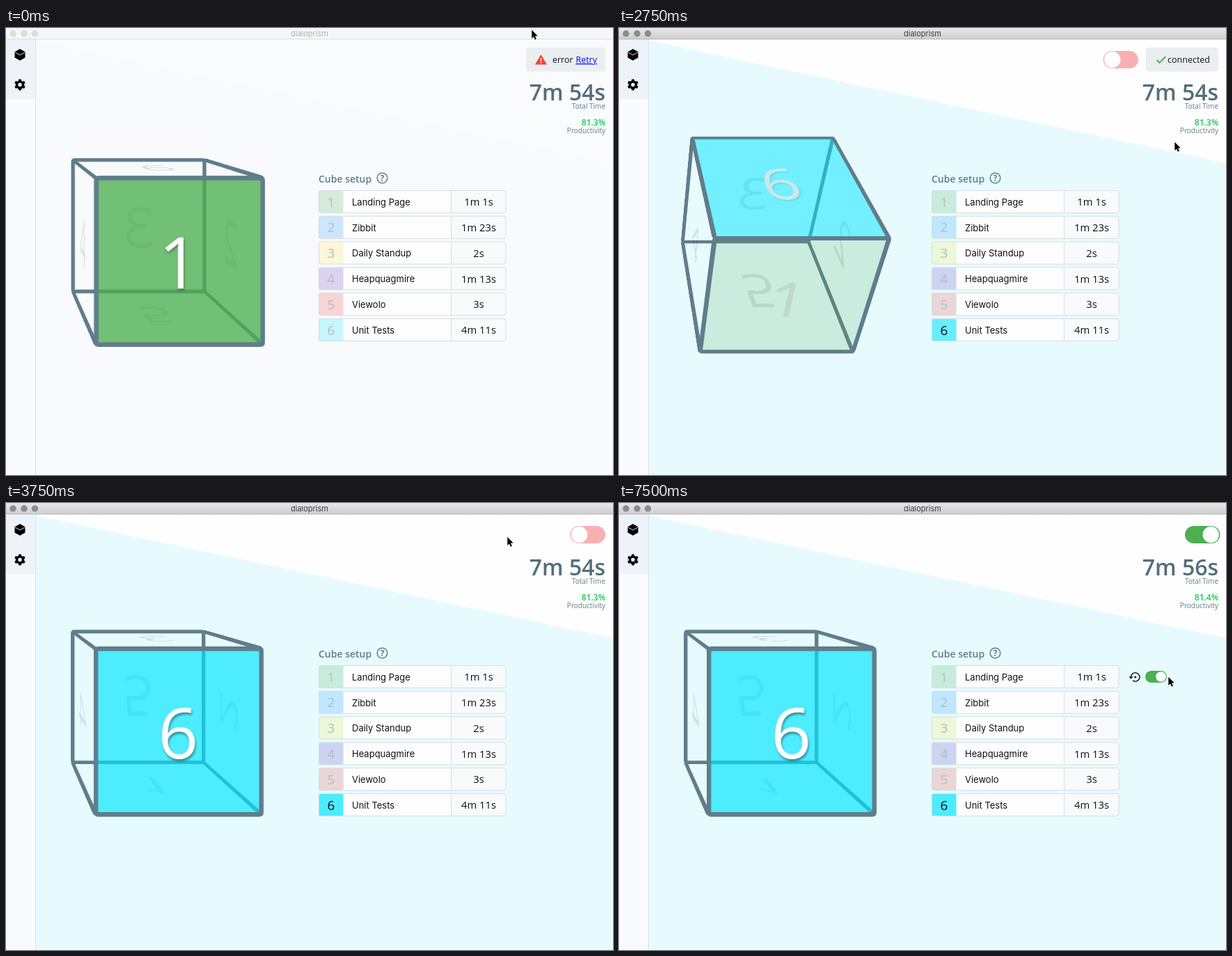
An HTML page that plays this animation: 872x642 px, repeating every 8 s.

```html
<!DOCTYPE html>
<html lang="en">
<head>
<meta charset="utf-8">
<title>Cube tracker</title>
<style>
html, body { margin: 0; width: 100%; height: 100%; overflow: hidden; background: #fff; }
#stage { position: absolute; left: 0; top: 0; width: 872px; height: 642px; overflow: hidden; }
svg { position: absolute; left: 0; top: 0; }
text { font-family: "Open Sans", "Noto Sans", sans-serif; fill: #111; }
.slate { fill: #607d8b; }
.ui { font-family: Inter, Roboto, sans-serif; }
.mid { text-anchor: middle; }
.end { text-anchor: end; }
#scene { position: absolute; inset: 0; perspective: 900px; perspective-origin: -29px 92px; }
#cube {
  position: absolute; left: 107.8px; top: 198px; width: 217px; height: 217px;
  transform-style: preserve-3d; transform-origin: 108.5px 104px .5px;
}
.face {
  position: absolute; inset: 0; box-sizing: border-box;
  border: 6px solid #607d8b; border-radius: 6px;
  font: 90px/205px "Open Sans", "Noto Sans", sans-serif; text-align: center;
  text-indent: -1px;
}
</style>
</head>
<body>
<div id="stage">
  <svg id="ui" width="872" height="642" viewBox="0 0 872 642">
    <defs>
      <linearGradient id="bar" x2="0" y2="1">
        <stop offset="0" stop-color="#e8e8e8"/><stop offset="1" stop-color="#cecece"/>
      </linearGradient>
    </defs>
    <rect id="back" width="872" height="642"/>
    <path id="wedge" d="M42 16H872V194L42 18z"/>
    <rect y="16" width="42" height="626" fill="#f8fafd"/>
    <rect y="16" width="42" height="86" fill="#eef2f9"/>
    <path d="M42.5 16V642" stroke="#dbe1e9"/>

    <path d="M20 30l7.5 4.2v8.4L20 46.800l-7.500-4.200v-8.400z"/>
    <path d="M13 35l7 3.800 7-3.800" fill="none" stroke="#eef2f9" stroke-width=".9"/>
    <g fill="none" stroke="#000">
      <circle cx="20" cy="81.500" r="4.500" stroke-width="3.600"/>
      <circle cx="20" cy="81.500" r="6.800" stroke-width="2.400" pathLength="12" stroke-dasharray="1 1" stroke-dashoffset="-.5"/>
    </g>

    <rect id="title" width="872" height="16"/>
    <path id="rule" d="M0 16H872"/>
    <g id="dots"><circle cx="10" cy="8" r="4.700"/><circle cx="26" cy="8" r="4.700"/><circle cx="41.500" cy="8" r="4.700"/></g>
    <text id="name" class="ui mid" x="436" y="12" font-size="11">dialoprism</text>

    <g id="error">
      <rect x="747" y="28" width="114" height="34.500" rx="4" fill="#ebeef1"/>
      <path d="M768.500 38l8.500 14.500h-17z" fill="#f44336"/>
      <path d="M768.500 43.500v4m0 1.300v1.700" stroke="#fff" stroke-width="1.500"/>
      <text x="785" y="50" font-size="12.500">error</text>
      <text x="849" y="50" font-size="12.500" class="end" style="fill:#0a0aee" text-decoration="underline">Retry</text>
    </g>
    <g id="connected">
      <rect x="757" y="28" width="104" height="34.500" rx="4" fill="#ebeef1"/>
      <path d="M772.500 46l4 4 8.800-9" fill="none" stroke="#4caf50" stroke-width="1.900"/>
      <text x="849" y="50" font-size="12.500" class="end">connected</text>
    </g>
    <g id="toggle">
      <rect y="33" width="50.500" height="25" rx="12.500"/>
      <circle id="knob" cy="45.500" r="11.700" fill="#fff"/>
    </g>
    <text id="total" class="end" x="861" y="104" font-size="32" font-weight="600" style="fill:#546e7a"></text>
    <text class="end slate" x="861" y="116" font-size="10">Total Time</text>
    <text id="rate" class="end" x="861" y="140" font-size="12" font-weight="600" style="fill:#17c653"></text>
    <text class="end slate" x="861" y="151" font-size="10">Productivity</text>

    <text class="slate" x="449" y="221.500" font-size="14" font-weight="600">Cube setup</text>
    <circle cx="540.500" cy="215.500" r="7.300" fill="none" stroke="#607d8b" stroke-width="1.500"/>
    <text class="slate mid" x="540.500" y="220" font-size="12" font-weight="700">?</text>
    <g id="rows"></g>

    <g id="hover">
      <path d="M735.500 250a6.200 6.200 0 1 1 2.400 4.900" fill="none" stroke="#222" stroke-width="1.600"/>
      <path d="M732.300 249.300h6.400l-3.200 3.600z" fill="#222"/>
      <circle cx="741.700" cy="250" r="1.600" fill="#222"/>
      <rect x="756" y="241" width="31" height="17" rx="8.500" fill="#4caf50"/>
      <circle cx="778.500" cy="249.500" r="7.300" fill="#fff"/>
    </g>
    <path id="cursor" d="M.3.700v12.200l2.700-2.500 1.900 4.300 2-.9-1.900-4.200h3.800z" stroke="#fff" stroke-width="1" paint-order="stroke"/>
  </svg>
  <div id="scene"><div id="cube"></div></div>
</div>
<script>
const $ = id => document.getElementById(id);
const LOOP = 8000, STEP = 250;

const sides = [
  { rgb: '76,175,80', turn: '', label: 'Landing Page', time: '1m 1s' },
  { rgb: '33,150,243', turn: 'rotateY(90deg)', label: 'Zibbit', time: '1m 23s' },
  { rgb: '255,235,59', turn: 'rotateY(180deg)', label: 'Daily Standup', time: '2s' },
  { rgb: '103,58,183', turn: 'rotateY(-90deg)', label: 'Heapquagmire', time: '1m 13s' },
  { rgb: '244,67,54', turn: 'rotateX(-90deg)', label: 'Viewolo', time: '3s' },
  { rgb: '0,229,255', turn: 'rotateX(90deg)', label: 'Unit Tests', time: '' }
];

// time, x, y of the pointer tip
const path = [
  [0, 755, 2], [750, 832, 46], [1500, 832, 46], [2250, 798, 148], [2500, 799, 154],
  [2750, 798, 163], [3250, 798, 163], [3750, 720, 48], [4000, 720, 48], [4750, 816, 52],
  [5500, 816, 52], [6000, 600, 244], [6500, 789, 249], [LOOP, 789, 249]
];

$('rows').innerHTML = sides.map((s, i) => {
  const y = 233.5 + i * 36.8;
  return `<g transform="translate(449 ${y.toFixed(1)})">
    <rect x="36" width="154" height="32" fill="#fdfdfe"/>
    <rect x="190" width="79" height="32" fill="#f9fafc"/>
    <rect class="chip" width="35.500" height="32" rx="2" fill="rgba(${s.rgb},.2)"/>
    <path d="M190.500 0v32" stroke="#d7dde3"/>
    <rect x=".5" width="268.500" height="32" rx="3" fill="none" stroke="#d7dde3"/>
    <text class="num mid" x="18" y="23" font-size="19" style="fill:#b5bcbf">${i + 1}</text>
    <text class="ui" x="48" y="21.300" font-size="13">${s.label}</text>
    <text class="time mid" x="230" y="21.800" font-size="14.800">${s.time}</text>
  </g>`;
}).join('');

// panels sit slightly inside the cube so their frames overlap at the edges
for (const [i, s] of sides.entries()) {
  const face = document.createElement('div');
  face.className = 'face';
  face.textContent = i + 1;
  face.style.color = 'rgba(0,0,0,.1)';
  face.style.transform = `${s.turn} translateZ(106px)`;
  $('cube').append(face);
}
const faces = document.querySelectorAll('.face');
const chip = document.querySelectorAll('.chip')[5];
const num = document.querySelectorAll('.num')[5];
const clock = document.querySelectorAll('.time')[5];

const clamp = v => Math.min(1, Math.max(0, v));
const show = (id, on) => $(id).style.display = on ? '' : 'none';
const fill = (id, color) => $(id).setAttribute('fill', color);

function pointer(t) {
  const i = path.findIndex(p => p[0] > t);
  const [t0, x0, y0] = path[i - 1], [t1, x1, y1] = path[i];
  const k = (t - t0) / (t1 - t0);
  return [x0 + (x1 - x0) * k, y0 + (y1 - y0) * k];
}

function paintFace(i, on, alpha) {
  const v = Math.round(255 * on ** .3), style = faces[i].style;
  style.background = `rgba(${sides[i].rgb},${alpha * on})`;
  style.color = `rgba(${v},${v},${v},${.1 + .9 * on})`;
  style.textShadow = on ? `1px 2px 3px rgba(0,0,0,${.4 * on ** 4})` : 'none';
}

function draw(t) {
  const active = t >= 750, cyan = t >= 2750;
  fill('title', active ? 'url(#bar)' : '#f6f6f6');
  $('rule').setAttribute('stroke', active ? '#b4b4b4' : '#dadada');
  fill('dots', active ? '#8c8c8c' : '#dcdcdc');
  $('name').style.fill = active ? '#3c3c3c' : '#b2b2b2';
  fill('back', cyan ? '#e7fbff' : '#f8fafe');
  fill('wedge', cyan ? '#fefefe' : '#fafbfd');

  // cube roll and cross-fade of the active side
  const k = clamp((t - 2620) / 1000);
  const roll = 1 - (1 - k) ** 3, fade = clamp(k / .171);
  $('cube').style.transform = `rotateX(${-90 * roll}deg)`;
  paintFace(0, 1 - fade, .78);
  paintFace(5, fade, .667);
  chip.setAttribute('fill', `rgba(${sides[5].rgb},${.2 + .467 * fade})`);
  num.style.fill = cyan ? '#111' : '#b5bcbf';

  const linked = t >= 1750, docked = t >= 3500, on = t >= 4750;
  show('error', !linked);
  show('connected', linked && !docked);
  show('toggle', linked);
  $('toggle').setAttribute('transform', `translate(${on ? 813 : docked ? 810.5 : 695.5})`);
  fill('toggle', on ? (t < 7500 ? '#66aa61' : '#4caf50') : '#f8b0b3');
  $('knob').setAttribute('cx', on ? 37.2 : 13.2);

  $('total').textContent = `7m ${54 + (t >= 6500) + (t >= 7500)}s`;
  $('rate').textContent = t >= 7500 ? '81.4%' : '81.3%';
  clock.textContent = `4m ${11 + (t >= 6000) + (t >= 7000)}s`;

  show('hover', t >= 6000);
  $('cursor').setAttribute('transform', `translate(${pointer(t)})`);
}

let last = -1;
function tick() {
  const t = Math.floor(performance.now() % LOOP / STEP) * STEP;
  if (t !== last) draw(last = t);
  requestAnimationFrame(tick);
}
tick();
</script>
</body>
</html>
```
